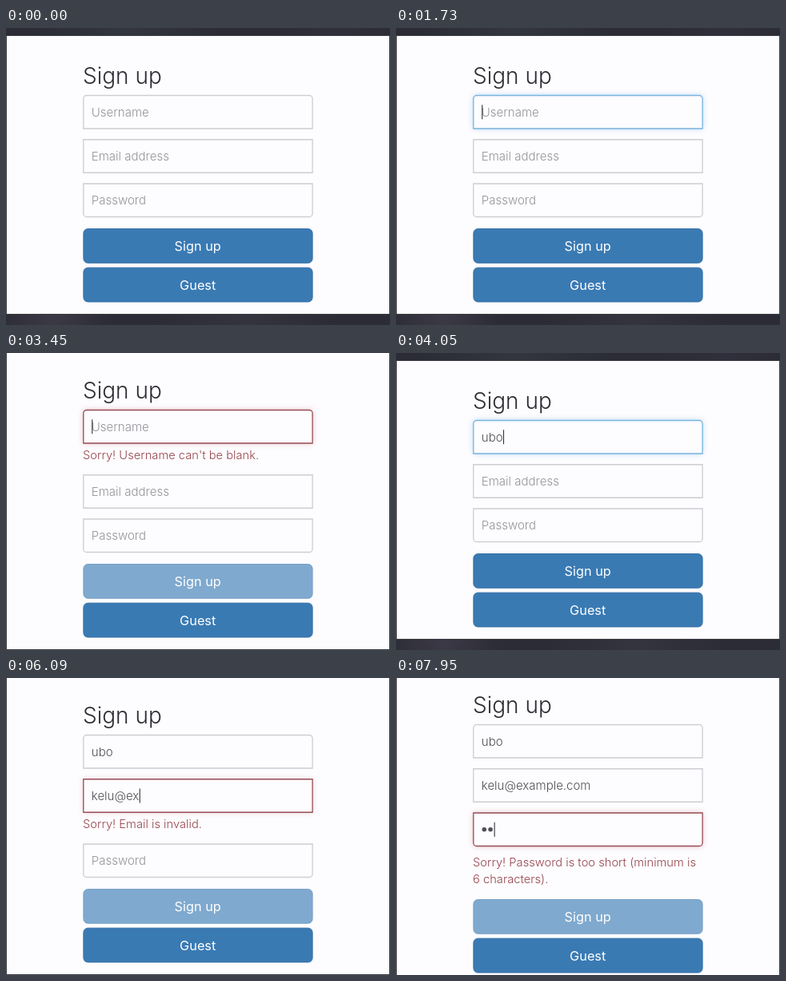
Recreate the animation shown at these times as an HTML page with a canvas. Size 480 by 372 pixels, loop 8 s.

```html
<!DOCTYPE html>
<html lang="en">
<head>
<meta charset="utf-8">
<title>Sign up form</title>
<style>
html, body { margin: 0; width: 100%; height: 100%; overflow: hidden; background: #fdfcfe; }
canvas { display: block; width: 480px; height: 372px; }
</style>
</head>
<body>
<canvas id="stage"></canvas>
<script>
const W = 480, H = 372, LOOP = 8000;
const LEFT = 96.8, WIDTH = 286.3, FIELD_H = 41.5;
const TEXT = 15, ERROR_TEXT = 14.7;
const FONT = 'Inter, "Liberation Sans", sans-serif';
const canvas = document.getElementById('stage');
const ctx = canvas.getContext('2d');
const dpr = window.devicePixelRatio || 1;
canvas.width = W * dpr;
canvas.height = H * dpr;

const GRAY = { border: [205, 205, 212], glow: [200, 200, 206, 0] };
const BLUE = { border: [122, 180, 220], glow: [102, 175, 233, 0.5] };
const RED = { border: [152, 76, 86], glow: [206, 132, 139, 0.55] };

// Each row: start time, value held until the next row
const focus = [[0, -1], [700, 0], [4300, 1], [7400, 2]];
const errors = [[0, null], [3060, 0], [3690, null], [4650, 1], [6920, null], [7690, 2]];
const fields = [
  { hint: 'Username', y: 84.5, radius: [4, 4, 0, 0],
    typed: [[0, ''], [2600, 'u'], [2980, ''], [3600, 'u'], [3760, 'ub'], [3910, 'ubo']],
    look: [[0, GRAY], [700, BLUE], [3060, RED], [3690, BLUE], [4300, GRAY]],
    error: ["Sorry! Username can't be blank."] },
  { hint: 'Email address', y: 139.75, radius: 0,
    typed: typing('kelu@example.com', [4560, 4860, 5090, 5330, 5600, 5840, 6050,
      6180, 6280, 6380, 6470, 6560, 6690, 6790, 6880, 6980]),
    look: [[0, GRAY], [4300, BLUE], [4650, RED], [6920, BLUE], [7400, GRAY]],
    error: ['Sorry! Email is invalid.'] },
  { hint: 'Password', y: 195, radius: [0, 0, 4, 4], secret: true,
    typed: typing('••', [7620, 7850]),
    look: [[0, GRAY], [7400, BLUE], [7690, RED]],
    error: ['Sorry! Password is too short (minimum is', '6 characters).'] }
];

function typing(text, times) {
  return [[0, '']].concat(times.map((t, i) => [t, text.slice(0, i + 1)]));
}

function indexAt(rows, t) {
  let i = 0;
  while (i + 1 < rows.length && rows[i + 1][0] <= t) i++;
  return i;
}

const valueAt = (rows, t) => rows[indexAt(rows, t)][1];
const mix = (a, b, k) => a.map((v, i) => v + (b[i] - v) * k);
const rgba = c => `rgba(${c.join(',')})`;

function lookAt(rows, t) {
  const i = indexAt(rows, t);
  const p = Math.min(1, (t - rows[i][0]) / 150);
  const k = p * p * (3 - 2 * p);
  const to = rows[i][1], from = i ? rows[i - 1][1] : to;
  return { border: mix(from.border, to.border, k), glow: mix(from.glow, to.glow, k) };
}

function label(text, x, baseline, size, color, weight = 300, align = 'left') {
  ctx.font = `${weight} ${size}px ${FONT}`;
  ctx.textAlign = align;
  ctx.fillStyle = color;
  ctx.fillText(text, x, baseline);
}

function box(x, y, w, h, r) {
  ctx.beginPath();
  ctx.roundRect(x, y, w, h, r);
}

function backdrop() {
  ctx.fillStyle = '#2b2c35';
  ctx.fillRect(0, 0, W, H);
  const spots = [[60, 366, 70, '#3c3946'], [300, 368, 110, '#34343f'],
    [150, 3, 120, '#34363f'], [410, 4, 80, '#30303c']];
  for (const [x, y, r, color] of spots) {
    const g = ctx.createRadialGradient(x, y, 0, x, y, r);
    g.addColorStop(0, color);
    g.addColorStop(1, color + '00');
    ctx.fillStyle = g;
    ctx.fillRect(x - r, y < 100 ? 0 : 358, 2 * r, 14);
  }
}

function card(shift) {
  const top = 10 - shift, height = 348 + 2 * shift;
  ctx.fillStyle = '#3c3d44';
  ctx.fillRect(0, top - 1, W, height + 2);
  ctx.fillStyle = '#fdfcfe';
  ctx.fillRect(1, top, W - 2, height);
}

function caret(t, x, middle) {
  const f = valueAt(focus, t);
  const typed = fields[f].typed;
  const since = Math.max(focus[indexAt(focus, t)][0], typed[indexAt(typed, t)][0]);
  if ((t - since) % 1000 >= 500) return;
  ctx.fillStyle = '#33333a';
  ctx.fillRect(x, middle - 9, 1.1, 18);
}

function drawField(field, y, t, active) {
  const { border, glow } = lookAt(field.look, t);
  const middle = y + FIELD_H / 2;
  box(LEFT, y, WIDTH, FIELD_H, field.radius);
  ctx.save();
  ctx.shadowColor = rgba(glow);
  ctx.shadowBlur = 7 * dpr;
  ctx.fillStyle = '#fdfcfe';
  ctx.fill();
  ctx.restore();
  ctx.strokeStyle = rgba(border);
  ctx.lineWidth = 1.3;
  ctx.stroke();

  const text = valueAt(field.typed, t);
  let end = 106.8;
  if (!text) {
    label(field.hint, end, middle + 5.3, TEXT, '#94949a');
  } else if (field.secret) {
    ctx.fillStyle = '#505056';
    for (let i = 0; i < text.length; i++) {
      ctx.beginPath();
      ctx.arc(110.3 + 7.8 * i, middle, 2.8, 0, 7);
      ctx.fill();
    }
    end += 7.7 * text.length;
  } else {
    label(text, end, middle + 5.3, TEXT, '#505056');
    end += ctx.measureText(text).width;
  }
  if (active) caret(t, end + 0.4, middle);
}

function button(text, y, color, edge) {
  box(96.9, y + 0.5, 286.2, 42.8, 5.5);
  ctx.fillStyle = color;
  ctx.fill();
  ctx.strokeStyle = edge;
  ctx.lineWidth = 1;
  ctx.stroke();
  label(text, 239.7, y + 28, 16.3, '#fff', 400, 'center');
}

function draw(t) {
  ctx.setTransform(dpr, 0, 0, dpr, 0, 0);
  const bad = valueAt(errors, t);
  const invalid = bad !== null;
  const lines = invalid ? fields[bad].error : [];
  const shift = 13 * lines.length;

  backdrop();
  card(shift);
  label('Sign up', 96, 69.5 - shift, 28, '#2c2c33');
  fields.forEach((field, i) => {
    const y = field.y + (invalid && i > bad ? shift : -shift);
    drawField(field, y, t, valueAt(focus, t) === i);
    if (i === bad) {
      const first = y + FIELD_H + (lines.length > 1 ? 25 : 20);
      lines.forEach((line, n) => label(line, 96, first + 21 * n, ERROR_TEXT, '#96464d'));
    }
  });
  const blue = ['#3a7ab3', '#336fa6'];
  const faded = ['#7fa9ce', '#79a2c7'];
  button('Sign up', 251 + shift, ...(invalid ? faded : blue));
  button('Guest', 299.7 + shift, ...blue);
}

const start = performance.now();
function tick() {
  draw((performance.now() - start) % LOOP);
  requestAnimationFrame(tick);
}
tick();
</script>
</body>
</html>
```
